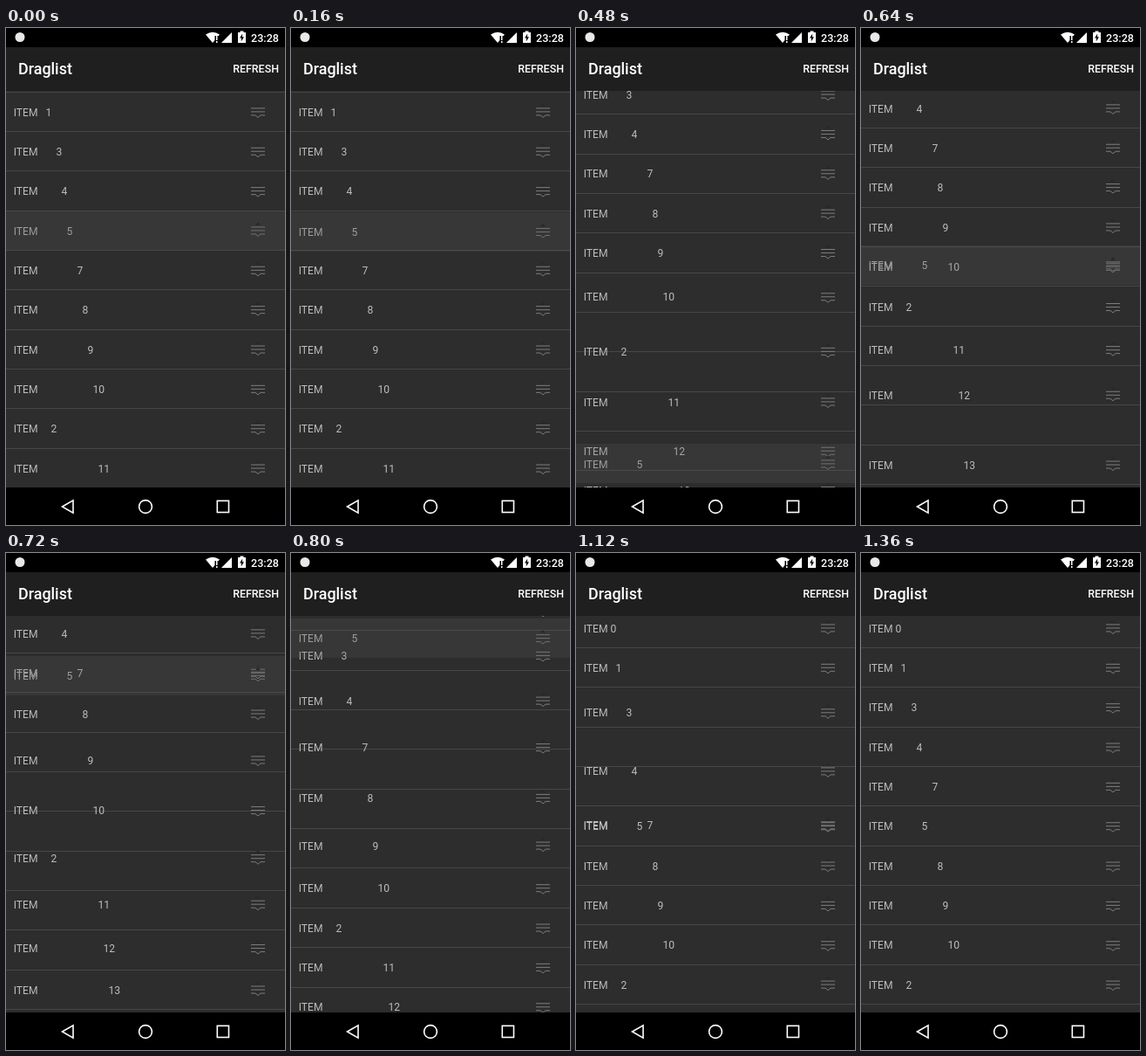
Recreate the animation shown at these times as an HTML page with a canvas. Size 320 px wide and 569 px high, loop 1520 ms.

```html
<!DOCTYPE html>
<html lang="en">
<head>
<meta charset="utf-8">
<title>Draglist</title>
<style>
  html, body { margin: 0; width: 100%; height: 100%; overflow: hidden; background: #000; }
  canvas { display: block; width: 320px; height: 569px; }
</style>
</head>
<body>
<canvas id="stage" width="320" height="569"></canvas>
<script>
const ctx = document.getElementById('stage').getContext('2d');

const LOOP = 1520, STEP = 80, LAST = 1360;
const TOP = 72, BOTTOM = 526;
const PITCH = 45.35, FIRST = 50.25;
const SHIFT_MS = 150, OVERLAP = 14, DROP = 1120;
const DRAGGED = 5, DROP_SLOT = 5;

const order = [0, 1, 3, 4, 5, 7, 8, 9, 10, 2, 11, 12, 13, 14];
const liftSlot = order.indexOf(DRAGGED);

// Turning points of the finger: [ms, y]
const fingerPath = [
  [0, 231.6], [235, 234], [320, 382.3], [425, 495], [480, 498.6], [590, 396], [640, 271.5],
  [720, 140], [765, 60], [800, 97.3], [840, 92], [960, 194.5], [1110, 330]
];

const ramp = (t, from, to) => Math.min(1, Math.max(0, (t - from) / (to - from)));
const ease = x => (1 - Math.cos(Math.PI * x)) / 2;
const scrollAt = t => 94.7 * ramp(t, 405, 514) - 130.1 * ramp(t, 735, 865);
const slotY = (slot, t) => FIRST + PITCH * slot - scrollAt(t);

function fingerAt(t) {
  let y = fingerPath[0][1];
  for (let i = 1; i < fingerPath.length; i++) {
    const [t0, y0] = fingerPath[i - 1], [t1, y1] = fingerPath[i];
    y += (y1 - y0) * ramp(t, t0, t1);
  }
  return y;
}

// A row makes way when the finger passes it and returns when the finger comes back.
function findMoves(slot) {
  const side = Math.sign(slot - liftSlot);
  const moves = [];
  let away = false;
  for (let t = 0; side && t < DROP; t++) {
    const rowY = slotY(away ? slot - side : slot, t);
    const passed = side * (fingerAt(t) - rowY);
    if (away ? passed < -OVERLAP : passed > OVERLAP) {
      moves.push({ start: t, by: away ? side : -side });
      away = !away;
    }
  }
  return moves;
}

const rowMoves = order.map((item, slot) => findMoves(slot));

function currentSlot(slot, t) {
  return rowMoves[slot].reduce(
    (sum, { start, by }) => sum + by * ease(ramp(t, start, start + SHIFT_MS)), slot);
}

function rect(color, x, y, w, h) {
  ctx.fillStyle = color;
  ctx.fillRect(x, y, w, h);
}

function text(str, x, y, size, weight, color, align = 'left') {
  ctx.font = `${weight} ${size}px Roboto, sans-serif`;
  ctx.textAlign = align;
  ctx.fillStyle = color;
  ctx.fillText(str, x, y);
}

function path(points, closed) {
  ctx.beginPath();
  points.forEach(([x, y]) => ctx.lineTo(x, y));
  if (closed) ctx.closePath();
}

function fillPath(color, points) {
  path(points, true);
  ctx.fillStyle = color;
  ctx.fill();
}

function disc(color, x, y, r) {
  ctx.beginPath();
  ctx.arc(x, y, r, 0, 2 * Math.PI);
  ctx.fillStyle = color;
  ctx.fill();
}

function handle(y, color) {
  fillPath('#282828', [[286, y - 6], [289, y - 9], [292, y - 6]]);
  ctx.strokeStyle = color;
  ctx.lineWidth = 1;
  for (const lineY of [y - 3.7, y + .3]) {
    path([[281, lineY], [297, lineY]]);
    ctx.stroke();
  }
  const low = y + 4.3;
  path([[281, low], [286, low], [289, low + 2.5], [292, low], [297, low]]);
  ctx.stroke();
}

function row(item, center, color, handleColor) {
  text('ITEM' + ' '.repeat(2 * item + 1) + item, 8.7, center + 4.9, 12.1, 400, color);
  handle(center, handleColor);
}

function drawList(t) {
  ctx.save();
  ctx.beginPath();
  ctx.rect(0, TOP, 320, BOTTOM - TOP);
  ctx.clip();
  rect('#2d2d2d', 0, TOP, 320, BOTTOM - TOP);

  order.forEach((item, slot) => {
    rect('#474747', 0, Math.round(slotY(slot, t) + 22.4), 320, 1);
    if (item !== DRAGGED) row(item, slotY(currentSlot(slot, t), t), '#bdbdbd', '#7c7c7c');
  });

  if (t < DROP) {
    const y = fingerAt(t);
    rect('rgba(90, 90, 90, .24)', 0, Math.round(y - 22.5), 320, 45);
    row(DRAGGED, y, '#9c9c9c', '#707070');
  } else {
    row(DRAGGED, slotY(DROP_SLOT, t), '#bdbdbd', '#7c7c7c');
  }
  ctx.restore();
}

function drawStatus() {
  rect('#000', 0, 0, 320, 22);
  disc('#e8e8e8', 16, 10.5, 5.5);

  ctx.beginPath();
  ctx.moveTo(237, 17);
  ctx.lineTo(229, 7.5);
  ctx.quadraticCurveTo(237, 2, 245, 7.5);
  ctx.fillStyle = '#fff';
  ctx.fill();
  rect('#000', 239.5, 9, 5, 9);
  rect('#fff', 241, 9, 1.5, 5);
  rect('#fff', 241, 15, 1.5, 2);

  fillPath('#fff', [[247, 17], [259, 17], [259, 5]]);

  rect('#fff', 266, 5, 9, 12);
  rect('#fff', 268.5, 3.5, 4, 2);
  fillPath('#000', [[271.2, 6.5], [268, 11.5], [270, 11.5], [269.7, 15.5], [273, 10.2], [271, 10.2]]);

  text('23:28', 313, 15.5, 12.6, 500, '#fff', 'right');
}

function drawHeader() {
  rect('#1f1f1f', 0, 22, 320, TOP - 22);
  text('Draglist', 14, 53, 17.9, 500, '#fff');
  text('REFRESH', 313, 51, 12.44, 500, '#fff', 'right');
}

function drawNav() {
  rect('#000', 0, BOTTOM, 320, 569 - BOTTOM);
  ctx.strokeStyle = '#fff';
  ctx.lineWidth = 1.6;
  path([[64.5, 548], [77, 540.8], [77, 555.2]], true);
  ctx.stroke();
  ctx.beginPath();
  ctx.arc(160, 548, 7.4, 0, 2 * Math.PI);
  ctx.stroke();
  ctx.strokeRect(242.3, 541.3, 13.2, 13.2);
}

let origin;
function frame(now) {
  origin ??= now;
  const t = Math.min(LAST, Math.floor(((now - origin) % LOOP) / STEP) * STEP);
  drawList(t);
  drawStatus();
  drawHeader();
  drawNav();
  requestAnimationFrame(frame);
}
requestAnimationFrame(frame);
</script>
</body>
</html>
```
